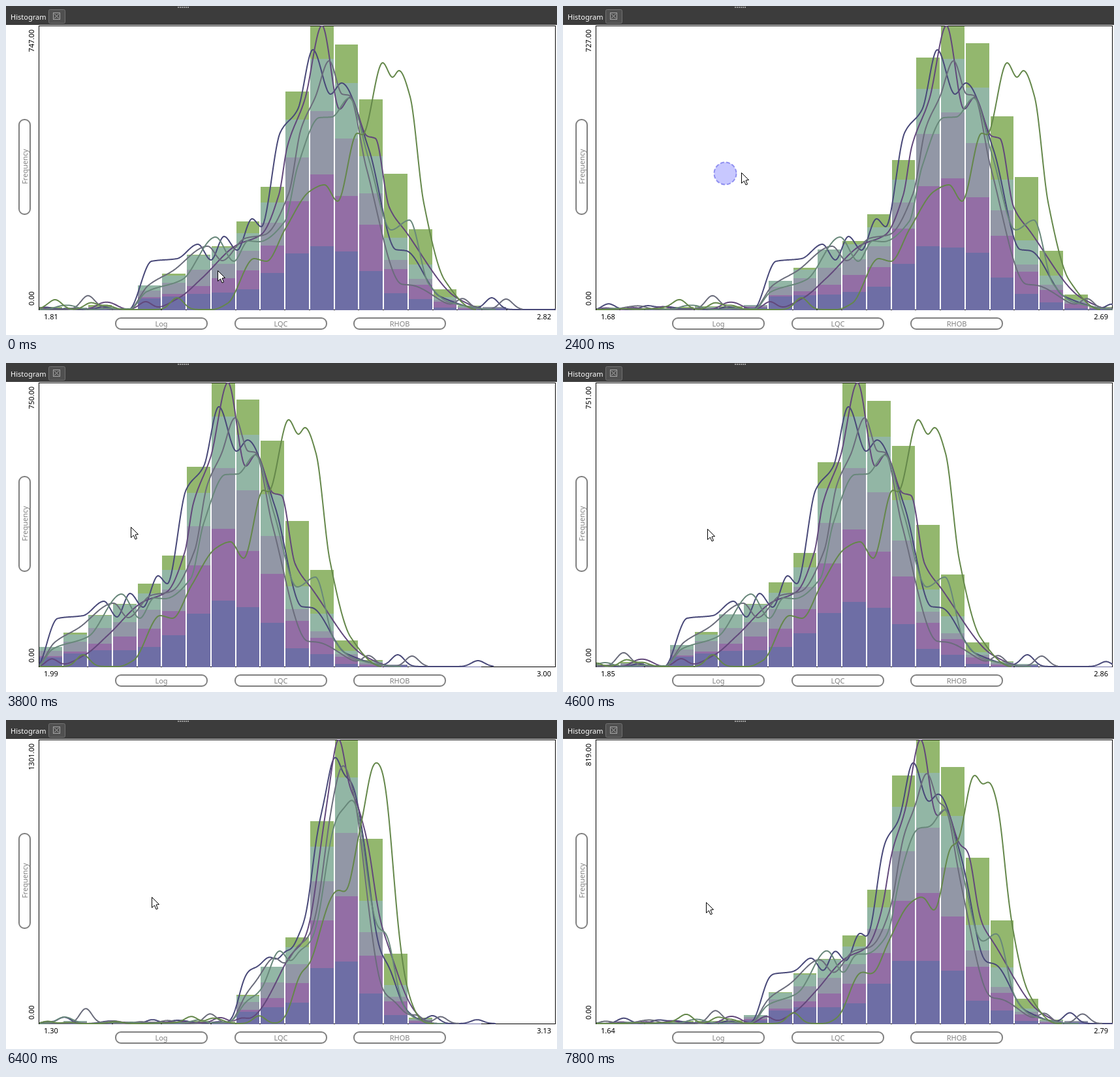
Recreate the animation shown at these times as an HTML page with a canvas. Size 844 by 504 pixels, loop 8 s.

```html
<!DOCTYPE html>
<html lang="en">
<head>
<meta charset="utf-8">
<title>Histogram</title>
<style>
  html, body { margin: 0; width: 100%; height: 100%; overflow: hidden; background: #fff; }
  canvas { display: block; width: 844px; height: 504px; }
</style>
</head>
<body>
<canvas id="stage" width="844" height="504"></canvas>
<script>
const ctx = document.getElementById('stage').getContext('2d');
const LEFT = 51, RIGHT = 842, BASE = 465, HEIGHT = 435, BINS = 21, PITCH = 37.75;
const LOOP = 8000, STEP = 200;

// Curves are stored in pixels of the home view, over LO to HI.
const HOME_MIN = 1.81, HOME_SPAN = 1.01, WIDTH = 790.5;
const LO = -470, HI = 1150;
const KERNEL = 9; // smoothing of the curves, in screen pixels

// Bottom of the stack first. Key points and small bumps are [x, height].
const series = [
  { fill: '#6e6ea5', line: '#484878', bumps: [[-281, 13], [-34, 9], [744, 18], [867, 9]],
    keys: [[188, 0], [223, 74], [262, 78], [294, 100], [314, 76], [334, 112], [354, 91], [377, 139],
      [391, 127], [420, 271], [447, 307], [470, 398], [497, 330], [514, 347], [556, 245], [597, 92],
      [613, 90], [665, 20], [740, 0]] },
  { fill: '#936ea5', line: '#62487b', bumps: [[214, 12], [165, 5]],
    keys: [[220, 0], [265, 18], [300, 48], [352, 98], [391, 115], [418, 176], [431, 250], [458, 323],
      [484, 435], [511, 307], [527, 325], [553, 266], [566, 262], [587, 157], [612, 120], [692, 17],
      [740, 0]] },
  { fill: '#9297a6', line: '#6a6c7b', bumps: [[-219, 35], [126, 18], [700, 14], [766, 16]],
    keys: [[188, 0], [218, 37], [255, 59], [309, 97], [331, 75], [366, 109], [397, 115], [433, 178],
      [452, 277], [474, 326], [495, 381], [515, 330], [526, 328], [552, 217], [606, 39], [623, 37],
      [690, 4], [740, 0]] },
  { fill: '#92b6a5', line: '#68877a', bumps: [[-285, 8], [100, 5]],
    keys: [[190, 0], [215, 27], [270, 46], [321, 111], [349, 74], [371, 105], [387, 104], [427, 135],
      [447, 220], [480, 294], [499, 295], [526, 324], [555, 233], [590, 122], [618, 137], [647, 40],
      [680, 11], [750, 0]] },
  { fill: '#93b76e', line: '#64874a', bumps: [[76, 14], [155, 6], [262, 18]],
    keys: [[315, 0], [340, 10], [380, 78], [399, 74], [428, 124], [465, 181], [488, 191], [508, 166],
      [538, 270], [546, 268], [577, 378], [592, 356], [602, 366], [619, 326], [640, 163], [672, 45],
      [720, 0]] }
];

// time, centre, span, top count
const view = [
  [1600, 2.315, 1.01, 747], [2400, 2.183, 1.01, 727], [3000, 2.012, 1.01, 747],
  [3800, 2.499, 1.01, 750], [4600, 2.357, 1.01, 751], [5200, 2.215, 1.01, 745],
  [6400, 2.215, 1.83, 1301], [6600, 2.215, 1.95, 1375], [6800, 2.215, 1.95, 1375],
  [7800, 2.215, 1.15, 819]
];
// time, x, y
const pointer = [
  [400, 324, 405], [1000, 303, 249], [1200, 303, 249], [1400, 303, 243], [1600, 303, 243],
  [2400, 273, 255], [3000, 281, 258], [3800, 191, 251], [4600, 221, 254], [6400, 223, 271],
  [7800, 219, 279]
];

let seed = 7;
function random() {
  seed = seed * 16807 % 2147483647;
  return seed / 2147483647;
}

const bump = ([center, height], x) => height * Math.exp(-(((x - center) / 14) ** 2));

// Cubic through the key points that stays flat at every peak and valley.
function hump(keys, x) {
  const i = keys.findIndex(k => k[0] > x) - 1;
  if (i < 0) return 0;
  const rise = j => keys[j] && keys[j + 1]
    ? (keys[j + 1][1] - keys[j][1]) / (keys[j + 1][0] - keys[j][0]) : 0;
  const slope = j => {
    const a = rise(j - 1), b = rise(j);
    return a * b > 0 ? 2 * a * b / (a + b) : 0;
  };
  const [x0, h0] = keys[i], [x1, h1] = keys[i + 1];
  const w = x1 - x0, t = (x - x0) / w, u = 1 - t;
  return h0 * (1 + 2 * t) * u * u + slope(i) * w * t * u * u
    + h1 * t * t * (3 - 2 * t) - slope(i + 1) * w * t * t * u;
}

function smooth(values, sigma) {
  if (sigma < 0.3) return values;
  const reach = Math.ceil(3 * sigma), kernel = [];
  for (let d = -reach; d <= reach; d++) kernel.push(Math.exp(-d * d / (2 * sigma * sigma)));
  const total = kernel.reduce((a, b) => a + b);
  return values.map((_, i) =>
    kernel.reduce((sum, k, j) => sum + k * (values[i + j - reach] || 0), 0) / total);
}

for (const s of series) {
  const last = s.bumps[s.bumps.length - 1][0];
  s.end = Math.max(s.keys[s.keys.length - 1][0], last + 25);
  const noise = Array.from({ length: 12 }, () => [-330 + 520 * random(), 5 * random()]);
  s.curve = Float64Array.from({ length: HI - LO + 1 }, (_, i) =>
    [...s.bumps, ...noise].reduce((sum, b) => sum + bump(b, LO + i), hump(s.keys, LO + i)));
  // The bars count unsmoothed data, so sharpen the curve for them.
  const soft = smooth(s.curve, KERNEL);
  s.raw = s.curve.map((v, i) => Math.max(0, 2 * v - soft[i]));
}

function valuesAt(track, time) {
  const next = track.findIndex(k => k[0] > time);
  if (next <= 0) return track[next < 0 ? track.length - 1 : 0].slice(1);
  const a = track[next - 1], b = track[next], t = (time - a[0]) / (b[0] - a[0]);
  return a.map((v, i) => v + (b[i] - v) * t).slice(1);
}

function text(str, x, y, color, align = 'left', turned = false) {
  ctx.save();
  ctx.translate(x, y);
  if (turned) ctx.rotate(-Math.PI / 2);
  ctx.font = '11px "Noto Sans", "Open Sans", sans-serif';
  ctx.textAlign = align;
  ctx.fillStyle = color;
  ctx.fillText(str, 0, 0);
  ctx.restore();
}

function roundBox(x, y, w, h, r, stroke, width, fill) {
  ctx.beginPath();
  ctx.roundRect(x, y, w, h, r);
  if (fill) { ctx.fillStyle = fill; ctx.fill(); }
  ctx.strokeStyle = stroke;
  ctx.lineWidth = width;
  ctx.stroke();
}

function drawFrame() {
  ctx.fillStyle = '#fff';
  ctx.fillRect(0, 0, 844, 504);
  ctx.fillStyle = '#3c3c3c';
  ctx.fillRect(0, 0, 844, 29);
  ctx.fillStyle = '#a0a0a0';
  for (let i = 0; i < 6; i++) ctx.fillRect(263 + i * 3, 1, 2, 2);
  text('Histogram', 7, 21, '#fff');

  roundBox(65.5, 5.5, 25, 21, 2, '#707070', 1, '#505050');
  ctx.strokeStyle = '#a8a8a8';
  ctx.strokeRect(72.5, 10.5, 10, 10);
  ctx.beginPath();
  ctx.moveTo(74, 12); ctx.lineTo(81, 19);
  ctx.moveTo(81, 12); ctx.lineTo(74, 19);
  ctx.stroke();

  roundBox(20, 174, 17, 145, 8, '#808080', 2);
  text('Frequency', 33, 246, '#808080', 'center', true);
  [['Log', 168], ['LQC', 351], ['RHOB', 533]].forEach(([name, x]) => {
    roundBox(x, 478, 140, 17, 8, '#808080', 2);
    text(name, x + 70, 491, '#808080', 'center');
  });
  ctx.strokeStyle = '#000';
  ctx.lineWidth = 1;
  ctx.strokeRect(50.5, 30.5, 791, 435);
}

function drawBars(valueAt) {
  const edge = k => Math.floor(LEFT + k * PITCH);
  const stacks = Array.from({ length: BINS }, (_, k) => series.map(s => {
    let sum = 0;
    for (let x = 0.5; x < PITCH; x++) sum += valueAt(s.raw, LEFT + k * PITCH + x);
    return sum;
  }));
  const tallest = Math.max(...stacks.map(s => s.reduce((a, b) => a + b)));
  stacks.forEach((stack, k) => {
    let sum = 0, bottom = BASE + 1;
    stack.forEach((part, i) => {
      sum += part;
      const top = Math.round(BASE + 1 - sum / tallest * HEIGHT);
      ctx.fillStyle = series[i].fill;
      ctx.fillRect(edge(k), top, edge(k + 1) - 2 - edge(k), bottom - top);
      bottom = top;
    });
  });
}

function drawCurves(valueAt, toHome, zoom) {
  const sigma = KERNEL * Math.sqrt(Math.max(0, zoom * zoom - 1));
  const curves = series.map(s => smooth(s.curve, sigma));
  const highest = Math.max(...curves.map(c => Math.max(...c)));
  // Data outside the view is not counted, so curves sink to half at its edges.
  const inside = d => 1 / (1 + Math.exp(-1.7 * d / KERNEL));
  ctx.lineWidth = 2;
  ctx.lineJoin = 'round';
  series.forEach((s, i) => {
    ctx.beginPath();
    for (let x = LEFT; x <= RIGHT && toHome(x) <= s.end + 2 * sigma; x++) {
      const h = valueAt(curves[i], x) / highest * inside(x - LEFT) * inside(RIGHT - x);
      ctx.lineTo(x, BASE - h * HEIGHT);
    }
    ctx.strokeStyle = s.line;
    ctx.stroke();
  });
}

function drawChart(center, span) {
  const min = center - span / 2, zoom = span / HOME_SPAN;
  const toHome = x => LEFT + (x - LEFT) * zoom + (min - HOME_MIN) / HOME_SPAN * WIDTH;
  const valueAt = (curve, x) => {
    const p = toHome(x) - LO, i = Math.floor(p);
    return (curve[i] || 0) * (1 - p + i) + (curve[i + 1] || 0) * (p - i);
  };
  ctx.save();
  ctx.beginPath();
  ctx.rect(50, 30, 792, 436);
  ctx.clip();
  drawBars(valueAt);
  drawCurves(valueAt, toHome, zoom);
  ctx.restore();
  text(min.toFixed(2), 58, 480, '#000');
  text((min + span).toFixed(2), 835, 480, '#000', 'right');
}

function drawPointer(x, y) {
  ctx.save();
  ctx.translate(x + 0.5, y + 0.5);
  ctx.beginPath();
  [[0, 0], [0, 16], [4, 12.5], [6.5, 18.5], [9, 17.5], [6.5, 11.5], [11, 11]]
    .forEach(p => ctx.lineTo(...p));
  ctx.closePath();
  ctx.fillStyle = '#fff';
  ctx.fill();
  ctx.strokeStyle = '#000';
  ctx.lineWidth = 1;
  ctx.stroke();
  ctx.restore();
}

function drawPress(x, y) {
  ctx.beginPath();
  ctx.arc(x, y, 17, 0, 2 * Math.PI);
  ctx.fillStyle = '#c8c8ff';
  ctx.fill();
  ctx.strokeStyle = '#9090f0';
  ctx.lineWidth = 2;
  ctx.setLineDash([6, 3]);
  ctx.stroke();
  ctx.setLineDash([]);
}

function draw(time) {
  const [center, span, count] = valuesAt(view, time);
  drawFrame();
  drawChart(center, span);
  text(Math.round(count) + '.00', 43, 36, '#000', 'right', true);
  text('0.00', 43, 459, '#000', 'left', true);
  if (time === 2400) drawPress(248.5, 256.5);
  drawPointer(...valuesAt(pointer, time));
}

let shown = -1;
function tick(now) {
  const time = Math.floor(now % LOOP / STEP) * STEP;
  if (time !== shown) draw(shown = time);
  requestAnimationFrame(tick);
}
tick(performance.now());
</script>
</body>
</html>
```
